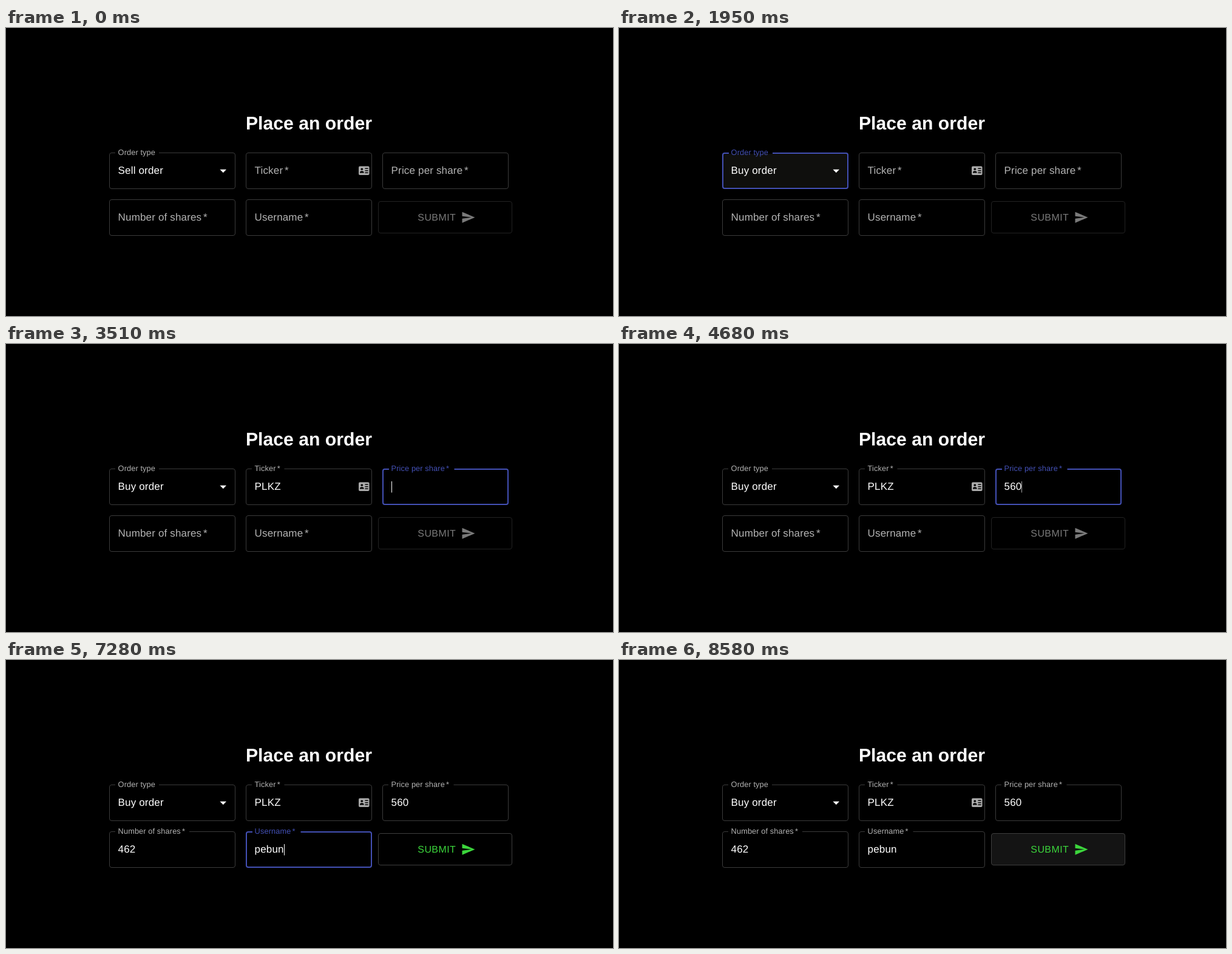
Recreate the animation shown at these times as an HTML page. Size 1000 by 474 pixels, loop 8.84 s.

```html
<!DOCTYPE html>
<html lang="en">
<head>
<meta charset="utf-8">
<title>Place an order</title>
<style>
  html, body { margin: 0; width: 100%; height: 100%; overflow: hidden; background: #000; }
  svg { display: block; width: 100%; height: 100%; }
  text {
    font: 17px "Liberation Sans", Arial, sans-serif;
    letter-spacing: .16px;
    text-rendering: geometricPrecision;
    white-space: pre;
  }
  .title { font-size: 30.2px; font-weight: 700; letter-spacing: 0; text-anchor: middle; }
  .submit { font-size: 15.94px; letter-spacing: .46px; }
</style>
</head>
<body>
<svg id="stage" viewBox="0 0 1000 474"></svg>
<script>
const LOOP = 8840, TICK = 130;
const LINE = [59, 59, 59], GREY = [179, 179, 179], BLUE = [67, 80, 181];
const DIM = [122, 122, 122], GREEN = [60, 214, 60];
const W = 208, H = 60;

// focus and hover are [start, end) spans; keys holds the time of each typed letter
const fields = [
  { x: 170, y: 205, label: 'Order type', notch: 72, shrunk: true, focus: [650, 2080], hover: [520, 650] },
  { x: 395, y: 205, label: 'Ticker', notch: 53.5, focus: [2080, 3380], value: 'PLKZ', keys: [2470, 2600, 2730, 2860] },
  { x: 620, y: 205, label: 'Price per share', notch: 107.5, focus: [3380, 5200], hover: [3250, 3380], value: '560', keys: [3900, 4160, 4290] },
  { x: 170, y: 282, label: 'Number of shares', notch: 122, focus: [5200, 6370], hover: [390, 520], value: '462', keys: [5460, 5590, 5720] },
  { x: 395, y: 282, label: 'Username', notch: 79.5, focus: [6370, 7930], hover: [5980, 6370], value: 'pebun', keys: [6890, 7020, 7150, 7150, 7280] }
];

const stage = document.getElementById('stage');

function add(tag, attrs, parent = stage, text = '') {
  const el = document.createElementNS('http://www.w3.org/2000/svg', tag);
  set(el, attrs);
  el.textContent = text;
  parent.appendChild(el);
  return el;
}
function set(el, attrs) {
  for (const k in attrs) el.setAttribute(k, attrs[k]);
}
const clamp = v => Math.max(0, Math.min(1, v));
const within = (t, span) => !!span && t >= span[0] && t < span[1];
const ramp = (t, start, ms) => clamp((t - start + TICK / 2) / ms) * (t >= start);
const easeOut = p => 1 - (1 - p) ** 3;
const mix = (a, b, p) => `rgb(${a.map((v, i) => Math.round(v + (b[i] - v) * p))})`;

// Rounded outline with a gap of the given width in its top edge
function outline(x, y, w, h, stroke, gap) {
  const i = stroke / 2, r = 4 - i;
  const l = x + i, t = y + i, rt = x + w - i, b = y + h - i;
  const arc = (dx, dy) => `a${r} ${r} 0 0 1 ${dx} ${dy}`;
  const start = x + 10 + (stroke > 1 ? 1 : 0);
  return `M${start + gap} ${t}H${rt - r}${arc(r, r)}V${b - r}${arc(-r, r)}` +
    `H${l + r}${arc(-r, -r)}V${t + r}${arc(r, -r)}H${start}`;
}

add('rect', { width: 1000, height: 474, fill: '#000' });
add('text', { class: 'title', x: 499, y: 167, fill: '#fff' }, stage, 'Place an order');

for (const f of fields) {
  f.box = add('path', { fill: 'none' });
  f.text = add('text', { x: f.x + 14.6, y: f.y + 35.3, fill: '#fff' });
  f.name = add('text', {}, stage, f.label);
  if (f.value) {
    add('tspan', { dx: 2.8 }, f.name, '*');
    f.caret = add('rect', { y: f.y + 21, width: 1, height: 18.5, fill: '#fff' });
  }
}
const order = fields[0];
const shade = add('rect', { x: 172, y: 207, width: 204, height: 56, fill: '#0f0f0d' });
stage.insertBefore(shade, order.box);
add('path', { d: 'M7 10l5 5 5-5z', fill: '#fff', transform: 'translate(345 222.2) scale(1.0625)' });

// Contact card icon in the ticker field
add('rect', { x: 581, y: 227.5, width: 17.5, height: 14.5, rx: 2, fill: '#aaa' });
add('circle', { cx: 586.3, cy: 232.3, r: 1.8 });
add('path', { d: 'M583 238.6v-.8c0-3.4 6.6-3.4 6.6 0v.8z' });
add('path', { d: 'M591.5 231.3h5M591.5 234.8h5M591.5 238.3h5', stroke: '#000', 'stroke-width': 1.4 });

const clip = add('clipPath', { id: 'inside' });
add('rect', { x: 614, y: 286, width: 220, height: 52, rx: 3 }, clip);
const button = add('rect', { x: 613.5, y: 285.5, width: 220, height: 52, rx: 3.5 });
const ripple = add('circle', { cx: 690, cy: 312, fill: mix(GREEN, GREEN, 0), 'clip-path': 'url(#inside)' });
const submit = add('g', {});
add('text', { class: 'submit', x: 678.3, y: 317.2 }, submit, 'SUBMIT');
add('path', { d: 'M2.01 21L23 12 2.01 3 2 10l15 2-15 2z', transform: 'translate(749.5 299.7)' }, submit);

function drawField(f, t) {
  const [on, off] = f.focus;
  const focused = within(t, f.focus);
  const up = f.shrunk ? 1 : easeOut(ramp(t, on, 200));
  const tint = easeOut(ramp(t, on, 200)) - easeOut(ramp(t, off, 200));
  const stroke = focused ? 2 : 1;
  set(f.box, {
    d: outline(f.x, f.y, W, H, stroke, up > 0 ? f.notch : 0),
    'stroke-width': stroke,
    stroke: focused ? mix(BLUE, BLUE, 0) : within(t, f.hover) ? '#fff' : mix(LINE, LINE, 0)
  });
  set(f.name, {
    transform: `translate(${f.x + 14.6} ${f.y + 35.3 - 31.1 * up}) scale(${1 - .25 * up})`,
    fill: mix(GREY, BLUE, tint)
  });
  if (!f.value) return;
  f.text.textContent = f.value.slice(0, f.keys.filter(k => k <= t).length);
  set(f.caret, {
    x: Math.round(f.x + 14.6 + f.text.getComputedTextLength()),
    opacity: focused ? (t >= 4680 && t < 5200 ? .65 : 1) : 0
  });
}

function draw(time) {
  const t = Math.floor((time % LOOP) / TICK) * TICK;
  order.text.textContent = t < 1950 ? 'Sell order' : 'Buy order';
  set(shade, { opacity: easeOut(ramp(t, 650, 200)) * (t < 2080) });
  fields.forEach(f => drawField(f, t));

  const ready = ramp(t, 6890, 250), over = ramp(t, 7670, 250);
  set(submit, { fill: mix(DIM, GREEN, ready) });
  set(button, {
    fill: mix([0, 0, 0], [20, 20, 20], over),
    stroke: mix([34, 34, 34], [62, 62, 62], ready)
  });
  const press = ramp(t, 7930, 580);
  set(ripple, { r: 150 * easeOut(press), opacity: press > 0 ? .2 * (1 - press) : 0 });
}

const begin = performance.now();
function frame() {
  draw(performance.now() - begin);
  requestAnimationFrame(frame);
}
frame();
</script>
</body>
</html>
```
